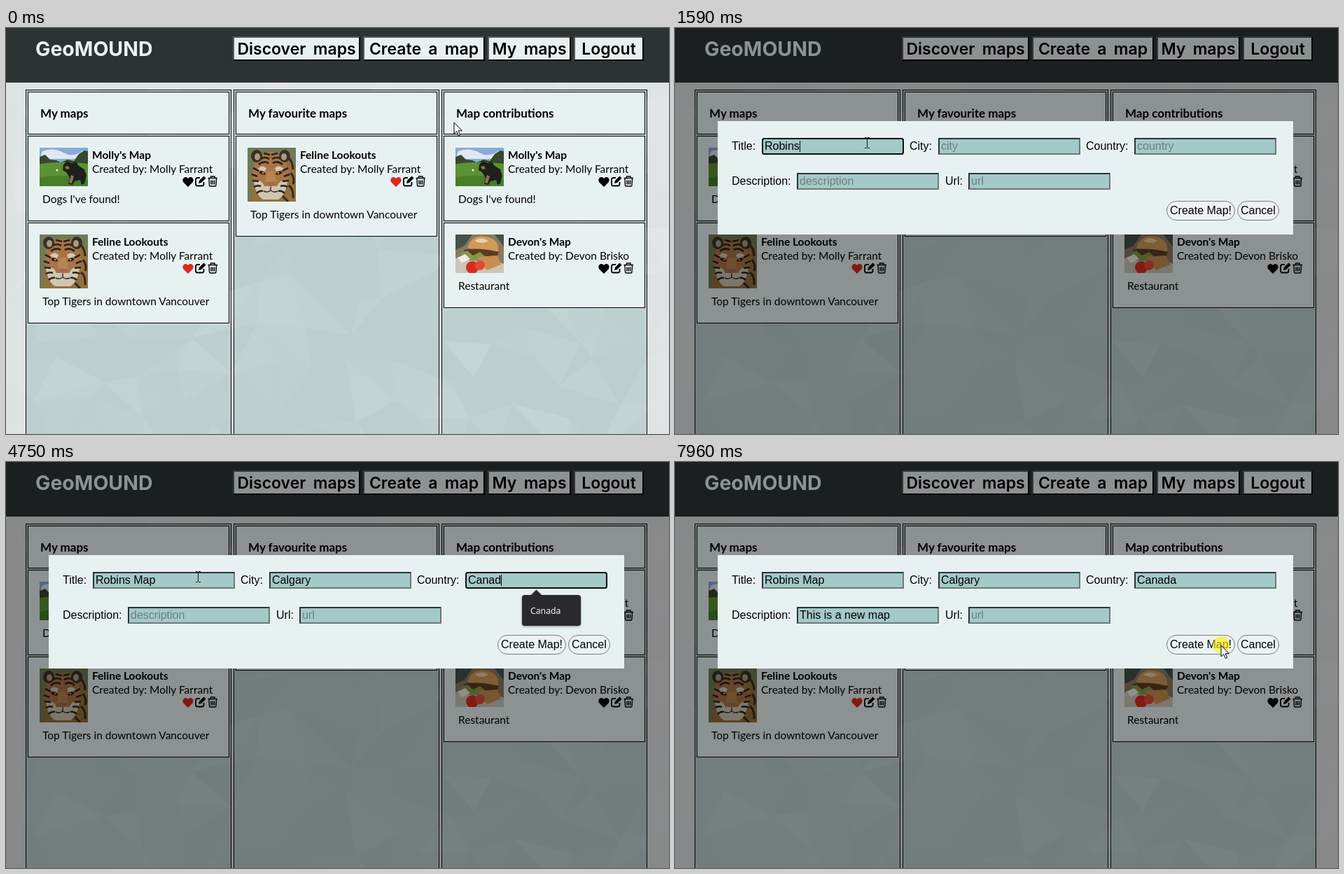
An HTML page that plays this animation: 947x580 px, repeating every 8 s.

```html
<!DOCTYPE html>
<html lang="en">
<head>
<meta charset="utf-8">
<title>Create a map</title>
<style>
html, body { margin: 0; width: 100%; height: 100%; overflow: hidden; }
svg { display: block; }
text { white-space: pre; }
.logo { font: 700 28.5px Inter, sans-serif; fill: #ebf2f2; }
.nav { font: 600 23px Inter, sans-serif; word-spacing: 4.5px; text-anchor: middle; }
.head { font: 700 17px Lato, sans-serif; }
.name { font: 700 15.5px Lato, sans-serif; }
.body { font: 15.5px Lato, sans-serif; }
.form { font: 16px "Liberation Sans", Arial, sans-serif; }
.hint { fill: #6c7f80; }
.option { font: 500 12.3px "Open Sans", sans-serif; fill: #fff; }
</style>
</head>
<body>
<svg width="947" height="580" viewBox="0 0 947 580">
  <defs>
    <symbol id="dog" viewBox="0 0 69 55">
      <path fill="#86acd8" d="M0 0H69V25H0z"/>
      <path fill="#dfe7ef" d="M4 5Q20-1 34 7T62 4L69 16H0z"/>
      <path fill="#36482e" d="M0 13l8-3 7 7 9 1 6 3 10-4 9 2 7-10 8-5 5 1V25H0z"/>
      <path fill="#5b9233" d="M0 23Q35 18 69 23V55H0z"/>
      <path fill="#477e27" d="M0 43Q30 36 69 46V55H0z"/>
      <path fill="#1d201b" d="M34 24l5-5 7 3 6-2 4 6 8 5 3 9-3 11-4 2-2-7-8 2-3 5-6-1 2-9-5-8-5-3z"/>
      <path fill="#96714a" d="M36 27l5-1 2 4-5 1zM45 39l4 2-3 10-4-1z"/>
      <circle cx="25" cy="32" r="1.6" fill="#f4f6ee"/>
    </symbol>
    <symbol id="tiger" viewBox="0 0 69 77">
      <path fill="#717a57" d="M0 0H69V77H0z"/>
      <path fill="#94703f" d="M38 10Q66 10 69 32V77H6V50z"/>
      <path fill="none" stroke="#33291f" stroke-width="3" d="M57 13q8 7 8 18M62 36q6 8 3 16M59 54q7 5 6 18M50 69l8 8"/>
      <ellipse cx="33" cy="38" rx="26" ry="32" fill="#a97445"/>
      <path fill="#cfc6b2" d="M9 47q12-2 15 8h18q4-10 15-8-2 20-13 27H22Q11 67 9 47z"/>
      <g id="half">
        <ellipse cx="13" cy="12" rx="8" ry="9" fill="#3a3025"/>
        <ellipse cx="14" cy="13" rx="4" ry="5" fill="#a99a7e"/>
        <path fill="#d3cab6" d="M14 31q6-8 13-2l-2 5z"/>
        <path fill="none" stroke="#29231c" stroke-width="2.6" d="M32 10l-9-2M31 16q-7-4-12 0M30 22q-7-4-14 2M8 29l8 4M6 38l8 3M7 47l9 1M9 56q5-3 10-1M13 65q4-4 9-3"/>
        <path fill="#201c16" d="M16 35q6-4 10 3-6 2-10-3z"/>
        <circle cx="22" cy="36" r="1.3" fill="#c4a848"/>
      </g>
      <use href="#half" transform="translate(66) scale(-1 1)"/>
      <path fill="#b98450" d="M28 33h10l3 17H25z"/>
      <path fill="#a0685c" d="M26 49h14l-7 7z"/>
      <path fill="none" stroke="#3d3027" stroke-width="1.6" d="M33 56v5q-5 4-10 1m10-1q5 4 10 1"/>
    </symbol>
    <symbol id="burger" viewBox="0 0 69 55">
      <path fill="#8a7860" d="M0 0H69V55H0z"/>
      <path fill="#46524a" d="M0 0H24L13 16 0 22zM56 0H69V17z"/>
      <path fill="#cbc6ba" d="M0 34Q32 24 69 42V55H0z"/>
      <path fill="#cf9a5a" d="M17 19Q23 0 43 3T61 24L46 29z"/>
      <path fill="#ead1a4" d="M27 9q10-7 20 0-8 6-20 0z"/>
      <path fill="#5f3a22" d="M12 22q20-4 50 3l-4 10-43-5z"/>
      <path fill="#7f9a47" d="M7 27l10-4 8 7 10-5 9 8 12-3-4 9-35-2z"/>
      <path fill="#c98d50" d="M30 32l30-2 5 13-20 8z"/>
      <circle cx="24" cy="47" r="9" fill="#d92c20"/>
      <circle cx="35" cy="44" r="7" fill="#e04a33"/>
      <path fill="#efece2" d="M3 33l11-5 7 7-12 6z"/>
    </symbol>
    <g id="heart"><path d="M8 15L1.5 8.5C-2 4 3.500-2 8 3C12.500-2 18 4 14.500 8.500z"/></g>
    <g id="tools" fill="none" stroke="#000" stroke-width="1.8">
      <path d="M7 3H3.500Q1 3 1 5.500V12q0 2.500 2.500 2.500H10q2.500 0 2.500-2.500V9"/>
      <path d="M5 11l1-4 6.500-6.500 3 3L9 10z" fill="#000" stroke="none"/>
      <path stroke-width="1.4" d="M18.500 3.500H32M22.500 3V1H28v2M20 4l.5 9.500q0 1.500 1.500 1.500h6.500q1.500 0 1.500-1.500L30.500 4M23 6.500v6M25.300 6.500v6M27.600 6.500v6"/>
    </g>
    <filter id="shadow" x="-10%" y="-10%" width="120%" height="130%">
      <feDropShadow dx="0" dy="1" stdDeviation="1.5" flood-opacity=".4"/>
    </filter>
  </defs>
  <g id="page"></g>
  <g id="live"></g>
</svg>
<script>
const LOOP = 8000;
const PALE = '#e8f1f1', TEAL = '#a4c9c9';
const $ = id => document.getElementById(id);

const rect = (x, y, w, h, fill, more = '') =>
  `<rect x="${x}" y="${y}" width="${w}" height="${h}" fill="${fill}" ${more}/>`;
const label = (x, y, str, cls) => `<text x="${x}" y="${y}" class="${cls}">${str}</text>`;
const outline = (x, y, w, h, fill) => rect(x + .5, y + .5, w, h, fill, 'stroke="#000"');

// Two-tone 2px border, as on default buttons and inputs
const bevel = (x, y, w, h, light, dark, fill) => rect(x, y, w, h, dark) +
  `<path fill="${light}" d="M${x} ${y}h${w}l-2 2H${x + 2}V${y + h - 2}l-2 2z"/>` +
  rect(x + 2, y + 2, w - 4, h - 4, fill);

// ---- Page behind the dialog ----
function facets(size) {
  let seed = 7, out = '';
  const random = () => (seed = seed * 16807 % 2147483647) / 2147483647;
  const cols = Math.ceil(947 / size) + 2, rows = Math.ceil(580 / size) + 2;
  const grid = Array.from({ length: rows }, (_, j) => Array.from({ length: cols }, (_, i) =>
    [(i - .5 + random() * .8) * size, (j - .5 + random() * .8) * size].map(Math.round)));
  const facet = (...points) => {
    out += `<path d="M${points.join('L')}z" fill="#fff" opacity="${(random() ** 2 * .12).toFixed(3)}"/>`;
  };
  for (let j = 0; j < rows - 1; j++) for (let i = 0; i < cols - 1; i++) {
    const a = grid[j][i], b = grid[j][i + 1], c = grid[j + 1][i], d = grid[j + 1][i + 1];
    if (random() < .5) { facet(a, b, c); facet(b, c, d); }
    else { facet(a, b, d); facet(a, c, d); }
  }
  return out;
}

const dogMap = { pic: 'dog', title: "Molly's Map", by: 'Molly Farrant', note: "Dogs I've found!", h: 55 };
const tigerMap = { pic: 'tiger', title: 'Feline Lookouts', by: 'Molly Farrant',
  note: 'Top Tigers in downtown Vancouver', h: 77, liked: true };
const foodMap = { pic: 'burger', title: "Devon's Map", by: 'Devon Brisko', note: 'Restaurant', h: 55 };
const columns = [
  ['My maps', dogMap, tigerMap],
  ['My favourite maps', tigerMap],
  ['Map contributions', dogMap, foodMap],
];

const card = (x, y, m) => outline(x + 3, y, 287, m.h + 66, PALE) +
  `<use href="#${m.pic}" x="${x + 20}" y="${y + 17}" width="69" height="${m.h}"/>` +
  label(x + 95, y + 33, m.title, 'name') +
  label(x + 95, y + 53, 'Created by: ' + m.by, 'body') +
  `<use href="#heart" x="${x + 224}" y="${y + 58}" fill="${m.liked ? '#d9291e' : '#000'}"/>` +
  `<use href="#tools" x="${x + 242}" y="${y + 57}"/>` +
  label(x + 24, y + m.h + 41, m.note, 'body');

function column([heading, ...maps], index) {
  const x = 28 + index * 297;
  let y = 154, out = outline(x + 3, 91, 287, 60, PALE) + label(x + 21, 128, heading, 'head');
  for (const m of maps) { out += card(x, y, m); y += m.h + 69; }
  return out;
}

const navButton = ([x, w, str]) => bevel(x, 12, w, 35, '#565b5b', '#000', PALE) +
  label(x + w / 2, 38, str, 'nav');

$('page').innerHTML = rect(0, 0, 947, 580, '#dfe2e3') +
  columns.map((_, i) => outline(28 + i * 297, 88, 293, 520, '#bccfcf')).join('') +
  facets(62) + columns.map(column).join('') +
  rect(0, 0, 947, 78, '#2d3333') + label(42, 40, 'GeoMOUND', 'logo') +
  [[324, 182, 'Discover maps'], [510, 174, 'Create a map'], [688, 119, 'My maps'], [811, 100, 'Logout']]
    .map(navButton).join('');

// ---- Dialog ----
// typing: [start, end, first length, last length]
const fields = [
  { name: 'Title', labelX: 81, x: 124, y: 157, text: 'Robins Map', menu: 142,
    options: ['Robin', 'Robin Map', 'Robin test map two', 'Robin walks'],
    typing: [[1040, 1270, 1, 3], [1380, 1380, 5, 5], [1590, 2030, 6, 10]] },
  { name: 'City', labelX: 335, x: 376, y: 157, text: 'Calgary', menu: 84,
    options: ['Calgar', 'Calgary'],
    typing: [[2580, 2580, 1, 1], [2790, 3230, 2, 6], [3440, 3440, 7, 7]] },
  { name: 'Country', labelX: 587, x: 656, y: 157, text: 'Canada', menu: 84,
    options: ['Canada', 'Chile'],
    typing: [[3980, 4190, 1, 2], [4420, 4540, 3, 4], [4750, 4860, 5, 6]] },
  { name: 'Description', labelX: 81, x: 174, y: 207, text: 'This is a new map', menu: 324,
    options: ['This is a test', 'This is where the burgers live. In vancouver mostly.'],
    typing: [[5180, 5500, 1, 4], [5610, 6390, 5, 14], [6610, 6710, 15, 16], [6930, 6930, 17, 17]] },
  { name: 'Url', labelX: 386, x: 419, y: 207, text: '', options: [], typing: [] },
];
const focusTimes = [[630, 0], [2450, 1], [3650, 2], [4960, 3], [7270, 4], [7960, -1]];
const caretOff = [[2130, 2450], [3750, 3980], [7030, 7270]];
const pointer = [[0, 640, 135], [100, 634, 112], [210, 622, 70], [310, 612, 42], [420, 609, 37],
  [830, 426, 96], [940, 274, 164], [7390, 400, 190], [7500, 640, 236], [7610, 715, 254], [7730, 780, 262]];
const clicks = [[520, 630], [7960, LOOP]];

const latest = (list, t) => list.filter(item => t >= item[0]).pop();
const within = (spans, t) => spans.some(([a, b]) => t >= a && t < b);
const pen = document.createElement('canvas').getContext('2d');

function typed(field, t) {
  const run = latest(field.typing, t);
  if (!run) return '';
  const [start, end, first, last] = run;
  const part = end > start ? Math.min(1, (t - start) / (end - start)) : 1;
  // small lead absorbs uneven key intervals
  return field.text.slice(0, Math.floor(first + part * (last - first) + .1));
}

function input(field, value, focused, caret) {
  const { x, y, name } = field;
  let out = label(field.labelX, y + 17, name + ':', 'form');
  out += focused
    ? rect(x + 1, y + 1, 201, 22, TEAL, 'rx="2.5" stroke="#0c1010" stroke-width="2"')
    : bevel(x, y, 203, 24, '#2c3333', '#6f7777', TEAL);
  out += label(x + 4, y + 17, value || name.toLowerCase(), value ? 'form' : 'form hint');
  if (focused && caret) {
    pen.font = '16px "Liberation Sans", Arial, sans-serif';
    out += rect(Math.round(x + 4 + pen.measureText(value).width), y + 4, 1, 16, '#000');
  }
  return out;
}

function suggestions({ x, y, menu, options }, value) {
  const found = value ? options.filter(o => o.startsWith(value)) : [];
  if (!found.length || found.length === 1 && found[0] === value) return '';
  const left = x + 81, top = y + 33;
  return `<g filter="url(#shadow)">` +
    rect(left, top, menu, found.length * 36 + 8, '#292a2d', 'rx="4"') +
    `<path d="M${x + 93} ${top + 1}l8.500-8.500 8.500 8.500z" fill="#292a2d"/></g>` +
    found.map((o, i) => label(left + 12, top + 27 + i * 36, o, 'option')).join('');
}

const pill = (x, w, str) =>
  rect(x + .5, 247.5, w - 1, 27, '#edf3f3', 'rx="13.5" stroke="#767c7c"') + label(x + 5, 266, str, 'form');

function dialog(t) {
  const focus = latest(focusTimes, t)[1];
  const values = fields.map(f => typed(f, t));
  const caret = !within(caretOff, t);
  return rect(0, 0, 947, 580, '#000', 'opacity=".4"') + rect(61, 133, 822, 162, PALE) +
    fields.map((f, i) => input(f, values[i], i === focus, caret)).join('') +
    pill(702, 98, 'Create Map!') + pill(803, 60, 'Cancel') +
    (focus >= 0 ? suggestions(fields[focus], values[focus]) : '');
}

function cursor(t) {
  const [, x, y] = latest(pointer, t);
  const glow = within(clicks, t) ? `<circle cx="${x}" cy="${y - 1}" r="12" fill="#fff000" opacity=".6"/>` : '';
  const shape = t >= 940 && t < 7390
    ? '<path d="M-3-7.500h2.500l1 1 1-1H4M.5-7V7M-3 7.500h2.500l1-1 1 1H4" fill="none" stroke="#111"/>'
    : '<path d="M0 0V16L3.700 12.600 6.300 18.600 8.600 17.600 6 11.800H11.300z" fill="#fff" stroke="#000"/>';
  return glow + `<g transform="translate(${x} ${y})">${shape}</g>`;
}

function render() {
  const t = performance.now() % LOOP;
  $('live').innerHTML = (t >= 630 ? dialog(t) : '') + cursor(t);
  requestAnimationFrame(render);
}
render();
</script>
</body>
</html>
```
